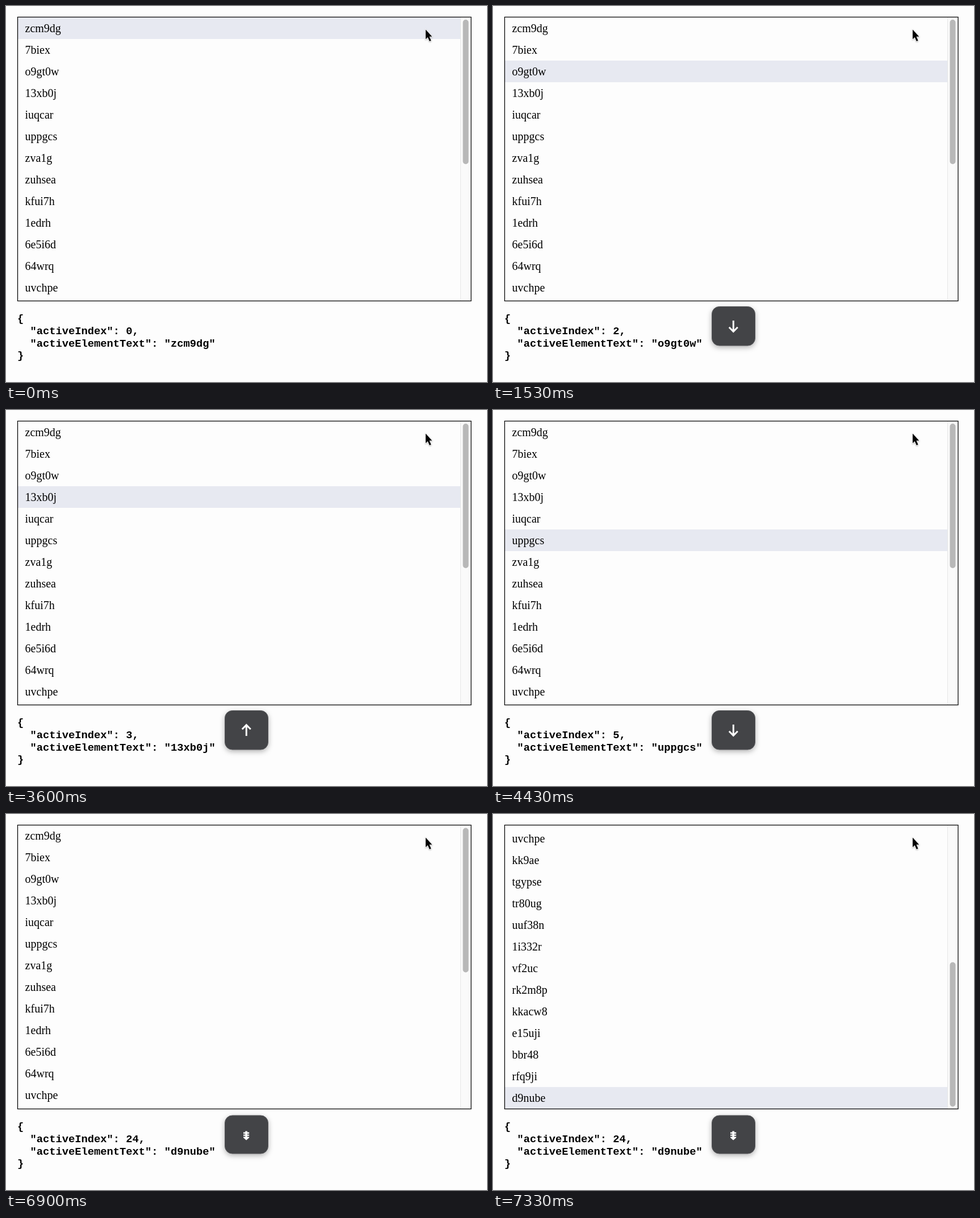
An HTML page that plays this animation: 847 px wide and 661 px high, repeating every 8 s.

```html
<!DOCTYPE html>
<html lang="en">
<head>
<meta charset="utf-8">
<title>Keyboard list navigation</title>
<style>
  html, body { margin: 0; width: 100%; height: 100%; overflow: hidden; background: #fdfdfd; }
  svg { display: block; width: 847px; height: 661px; }
  #rows { font: 20px "Liberation Serif", "Times New Roman", serif; }
  #json { font: bold 18.75px "Liberation Mono", "Courier New", monospace; }
  #key { filter: drop-shadow(0 3px 5px rgba(0, 0, 0, .3)); }
  .arrow { fill: none; stroke: #fff; stroke-width: 3; }
  .page { fill: #fff; }
</style>
</head>
<body>
<svg viewBox="0 0 847 661">
  <defs>
    <clipPath id="view"><rect x="21" y="20" width="798" height="498"/></clipPath>
  </defs>
  <g clip-path="url(#view)">
    <rect id="active" x="21" width="779" height="38" fill="#e7e9f1"/>
    <g id="rows"></g>
  </g>
  <rect x="800" y="20" width="18.5" height="498" fill="#fafafa"/>
  <rect x="800" y="20" width="1" height="498" fill="#e6e6e6"/>
  <rect id="thumb" x="804.5" y="24" width="10" height="254" rx="5" fill="#b8b8b8"/>
  <rect x="20.5" y="19.5" width="798.5" height="499" fill="none" stroke="#000" stroke-width="1.25"/>
  <g id="json">
    <text x="20" y="555">{</text>
    <text id="indexLine" x="42.5" y="577"></text>
    <text id="textLine" x="42.5" y="599"></text>
    <text x="20" y="620">}</text>
  </g>
  <g id="key">
    <rect id="cap" x="385.5" width="76" rx="13" fill="#434447" stroke="#56575a"/>
    <g id="down" class="arrow"><path d="M423.3 553V572M415.8 564.8L423.3 572.3L430.8 564.8"/></g>
    <g id="up" class="arrow"><path d="M423.3 573V554M415.8 561.2L423.3 553.7L430.8 561.2"/></g>
    <g id="end" class="page"><path id="pageShape" d="M421.3 557.5h3.6v2h3.3v2.4h-3.3v1.5h3.3v2.4h-3.3v1.7h3.3v1.5l-5.1 4.5l-5.1-4.5v-1.5h3.3v-1.7h-3.3v-2.4h3.3v-1.5h-3.3v-2.4h3.3z"/></g>
    <g id="home" class="page" transform="matrix(1 0 0 -1 0 1131)"><use href="#pageShape"/></g>
  </g>
  <path d="M739 41.5V58.3L742.7 54.9L745.8 62L748.6 60.8L745.5 53.8H750.3Z" stroke="#fff" stroke-width="1.4" paint-order="stroke" style="filter:drop-shadow(0 1px 1px rgba(0,0,0,.3))"/>
</svg>
<script>
const LOOP = 8000, ROW = 38, TOP = 20, MAX_SCROLL = 452, THUMB_TRAVEL = 236.5;
const items = ("zcm9dg 7biex o9gt0w 13xb0j iuqcar uppgcs zva1g zuhsea kfui7h 1edrh 6e5i6d 64wrq uvchpe " +
  "kk9ae tgypse tr80ug uuf38n 1i332r vf2uc rk2m8p kkacw8 e15uji bbr48 rfq9ji d9nube").split(" ");

// [time, active index, key pressed]
const presses = [
  [0, 0, ""],
  [1366, 1, "down"], [1533, 2, "down"], [1700, 3, "down"],
  [1866, 4, "down"], [2033, 5, "down"], [2400, 6, "down"],
  [3233, 5, "up"], [3433, 4, "up"], [3600, 3, "up"], [3766, 2, "up"],
  [4100, 3, "down"], [4266, 4, "down"], [4433, 5, "down"],
  [5400, 0, "home"], [6900, 24, "end"]
];
const keys = ["down", "up", "home", "end"];
const $ = id => document.getElementById(id);
const set = (id, name, value) => $(id).setAttribute(name, value);

items.forEach((label, i) => {
  const row = document.createElementNS("http://www.w3.org/2000/svg", "text");
  row.setAttribute("x", 33.5);
  row.setAttribute("y", TOP + i * ROW + 26);
  row.textContent = label;
  $("rows").append(row);
});

// cubic-bezier(.42, 0, .58, 1), solved by bisection
function easeInOut(x) {
  if (x <= 0) return 0;
  if (x >= 1) return 1;
  let lo = 0, hi = 1, s = .5;
  for (let i = 0; i < 24; i++) {
    s = (lo + hi) / 2;
    const at = 1.26 * s * (1 - s) ** 2 + 1.74 * s * s * (1 - s) + s ** 3;
    if (at < x) lo = s; else hi = s;
  }
  return s * s * (3 - 2 * s);
}

function render(time) {
  const t = Math.floor((time + 4) * .03) / .03 + .01;
  const [, index, key] = presses.findLast(p => p[0] <= t);
  const progress = easeInOut((t - 6885) / 435);
  const scroll = progress * MAX_SCROLL;

  set("rows", "transform", `translate(0 ${-scroll})`);
  set("active", "y", TOP + index * ROW - scroll);
  set("thumb", "y", 24 + progress * THUMB_TRAVEL);
  $("indexLine").textContent = `"activeIndex": ${index},`;
  $("textLine").textContent = `"activeElementText": "${items[index]}"`;

  const capTop = key === "home" || key === "end" ? 530 : 528.5;
  set("key", "visibility", key ? "visible" : "hidden");
  set("cap", "y", capTop);
  set("cap", "height", 597 - capTop);
  keys.forEach(k => set(k, "display", k === key ? "inline" : "none"));
}

const start = performance.now();
function tick() {
  render((performance.now() - start) % LOOP);
  requestAnimationFrame(tick);
}
tick();
</script>
</body>
</html>
```
